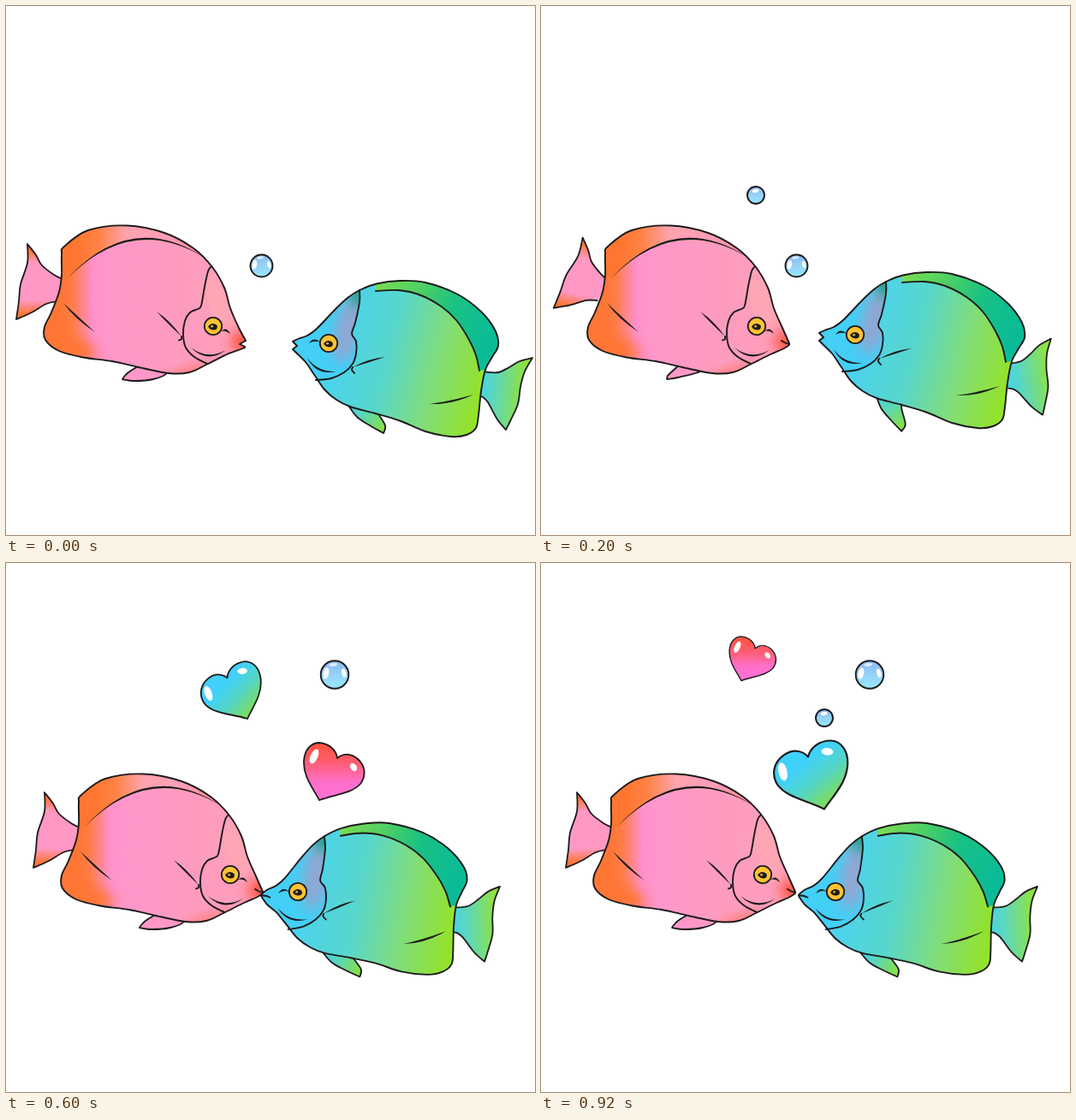
An HTML page for the animation above (1 s loop, 618 by 618 pixels).

```html
<!DOCTYPE html>
<html lang="en">
<head>
<meta charset="utf-8">
<title>Kissing fish</title>
<style>
html, body { margin: 0; width: 100%; height: 100%; overflow: hidden; background: #fff; }
svg { display: block; width: 100%; height: 100%; }
.ink { fill: none; stroke: #1c1a1c; stroke-width: 1.9; stroke-linejoin: round; stroke-linecap: round; }
.fill { stroke: #1c1a1c; stroke-width: 1.8; stroke-linejoin: round; }
.stroke { fill: #1c1a1c; }
</style>
</head>
<body>
<svg id="stage" viewBox="0 0 618 618" xmlns="http://www.w3.org/2000/svg"></svg>
<script>
// Smooth curve through points; "|" marks a sharp corner at the point before it.
function spline(text, close) {
  let d = "", last = null;
  for (const part of text.split("|")) {
    const p = part.trim().split(/\s+/).map(s => s.split(",").map(Number));
    if (last) p.unshift(last);
    else d = "M" + p[0];
    for (let i = 0; i < p.length - 1; i++) {
      const a = p[i - 1] || p[i], b = p[i], c = p[i + 1], e = p[i + 2] || c;
      const q = k => (b[k] + (c[k] - a[k]) / 6).toFixed(1);
      const r = k => (c[k] - (e[k] - b[k]) / 6).toFixed(1);
      d += `C${q(0)},${q(1)} ${r(0)},${r(1)} ${c}`;
    }
    last = p[p.length - 1];
  }
  return d + (close ? "Z" : "");
}

const path = (d, attrs) => `<path d="${d}" ${attrs}/>`;
const ink = text => path(spline(text), 'class="ink"');

// Brush line, thin at both ends.
function brush(x1, y1, cx, cy, x2, y2, w = 2.3) {
  const len = Math.hypot(x2 - x1, y2 - y1);
  const nx = (y1 - y2) / len * w, ny = (x2 - x1) / len * w;
  return path(`M${x1},${y1}Q${cx + nx},${cy + ny} ${x2},${y2}Q${cx - nx},${cy - ny} ${x1},${y1}Z`, 'class="stroke"');
}

function linear(id, x1, y1, x2, y2, stops) {
  const list = stops.map(([at, color]) => `<stop offset="${at}" stop-color="${color}"/>`).join("");
  return `<linearGradient id="${id}" gradientUnits="userSpaceOnUse" x1="${x1}" y1="${y1}" x2="${x2}" y2="${y2}">${list}</linearGradient>`;
}

const spot = (x, y, rx, ry, turn, color, more = "") =>
  `<ellipse cx="${x}" cy="${y}" rx="${rx}" ry="${ry}" transform="rotate(${turn} ${x} ${y})" fill="${color}" ${more}/>`;
const soft = 'filter="url(#soft)"';

function eye(x, y) {
  return `<circle cx="${x}" cy="${y}" r="10.2" fill="#ffc234" class="fill"/>` +
    path(`M${x - 6},${y + .2}Q${x - 1},${y - 5.5} ${x + 4.5},${y - 1}Q${x + 6},${y + 4} ${x + 1},${y + 4.6}Q${x - 4},${y + 4.5} ${x - 6},${y + .2}Z`, 'class="stroke"') +
    spot(x - 1.4, y + .2, 1.5, 1.3, 0, "#e8b040");
}

const pink = {
  top: "272,376 262,353 255,329 241,305 219,283 185,265 141,256.5 96,262 68,281 65,290 65,314 62,334 53,358 45,375 46,390 62,403 90,410.5 124,415 155,422 190,429 214,428 235,418.5 258,407 ",
  open: ["280,391 ", "277,400 279,398 | 273,395 | 280,391"],
  shut: ["280,394 ", "272,401 280,396 | 280,394"],
  fin: ["154,421 143,428 138,433 136,436 | 150,438 172,436 188,429 185,422",
        "154,417 143,427 138,432 137,436 | 150,434 176,427 175,420"],
  tail: "66,319 56,314 42,303 35,291 25,278 | 25,300 17,325 15,345 12,366 | 30,358 47,348 60,345",
  dorsal: "72,318 91,301 112,286 137,277 163,274.5 190,277 213,284 232,294",
  face: "240,304 236,310 232,328 228,350 224,354 215,358 209,368 207,384 210,399 220,410 235,418"
};

const blue = {
  top: "341,389 352,385 363,377 385,354 399,341 413,332 433,324.5 460,321 490,323 528,337 556,358 572,380 575,397 568,410 560,425 555,450 552,478 549,493 538,501 520,503 490,497 460,484.5 430,475.5 402,468 386,460 372,448 361,432 350,416 340,406 ",
  open: ["335,392 ", "335,401 | 340,397 | 335,392"],
  shut: ["334,394 ", "334,396 | 334,394"],
  fin: "398,464 410,480 425,490 441,499 | 443,490 434,475 432,470",
  tail: "552,425 561,427.5 575,428 588,422 600,415 615,411 | 606,427 601,445 598,465 589,485 584,495 | 574,483 563,463 557,457 552,455",
  dorsal: "432,333 458,332 482,337 507,350 526,367 541,390 549,408 553,426",
  face: "413,332 413,346 408,370 404,383 409,392 409,406 405,418 395,428 380,435 362,437"
};

const bodyPath = (fish, open) => {
  const [start, end] = open ? fish.open : fish.shut;
  return spline(start + fish.top + end, true);
};

// A heart whose tip is at the origin.
const heartPath = "M0,0C-8,-15 -19,-28 -18,-46C-17,-61 -8,-67 0,-67C12,-66 20,-58 21,-49C28,-55 37,-55 45,-48C54,-40 55,-28 48,-19C37,-7 18,-7 0,0Z";

const defs = `<defs>
  <filter id="soft" x="-60%" y="-60%" width="220%" height="220%"><feGaussianBlur stdDeviation="8"/></filter>
  <clipPath id="pinkClip"><path class="pinkBody"/></clipPath>
  <clipPath id="blueClip"><path class="blueBody"/></clipPath>
  <clipPath id="blueFace"><path d="${spline(blue.face)}L320,437L320,332Z"/></clipPath>` +
  linear("pinkFill", 45, 345, 280, 345, [[.08, "#ff7634"], [.14, "#ff7c48"], [.24, "#ff90cc"], [.32, "#ff97cb"], [.6, "#fd9bc0"], [1, "#ff9fb9"]]) +
  linear("pinkTop", 65, 290, 240, 290, [[.1, "#ff7630"], [.24, "#ff8243"], [.43, "#ffa3ae"], [.7, "#ff9db9"], [1, "#ff8386"]]) +
  linear("pinkTail", 0, 278, 0, 366, [[.08, "#ff7430"], [.25, "#ff98c2"], [.74, "#ff98c6"], [.94, "#ff7430"]]) +
  linear("blueFill", 385, 395, 555, 440, [[0, "#4bd3ee"], [.35, "#57d6cc"], [.68, "#80dd7c"], [1, "#93e22c"]]) +
  linear("blueTop", 435, 325, 565, 395, [[0, "#78dc55"], [.3, "#50d062"], [.62, "#18c184"], [1, "#0bbb97"]]) +
  linear("blueTail", 556, 440, 606, 445, [[0, "#48d4e2"], [.35, "#5fd8b6"], [1, "#92e23a"]]) +
  linear("blueFin", 405, 468, 440, 497, [[0, "#48d2e4"], [.45, "#60d8a8"], [1, "#8ae03c"]]) +
  linear("warm", 0, -67, 0, 0, [[.08, "#ff5545"], [.35, "#ff5d74"], [.68, "#ff70cb"], [1, "#ff70d6"]]) +
  linear("cool", 35, -55, -10, -10, [[.25, "#40d1fa"], [.6, "#54d5c4"], [1, "#83de50"]]) +
  linear("water", 0, -1, 0, 1, [[0, "#8bb9ef"], [.5, "#96d2f8"], [1, "#96e7ff"]]) +
  "</defs>";

const pinkFish = `<g id="pink">
  <path id="pinkFin" class="fill" fill="#ff98c9"/>
  <g id="pinkTailPart">${path(spline(pink.tail), 'class="fill" fill="url(#pinkTail)"')}</g>
  <g clip-path="url(#pinkClip)">
    <path class="pinkBody" fill="url(#pinkFill)"/>
    ${spot(72, 400, 34, 15, 14, "#ff7634", soft)}
    ${path(spline(pink.dorsal) + "L250,310L250,245L60,245L60,318Z", 'fill="url(#pinkTop)"')}
    ${spot(249, 345, 13, 35, -18, "#ffa8b3", soft)}
    ${spot(218, 430, 30, 7, -15, "#ff7460", soft)}
    ${spot(276, 392, 12, 12, 0, "#ff4526", soft)}
  </g>
  <path class="pinkBody ink"/>
  ${brush(72, 318, 147, 240, 232, 294)}
  ${ink(pink.face)}
  ${brush(67, 347, 82, 364, 104, 381)}
  ${brush(176, 357, 190, 369, 205, 386)}
  ${ink("205,386 205,389 202,390.5")}
  ${brush(216, 399, 235, 416, 257, 402)}
  ${brush(251, 380, 257, 376, 262, 383)}
  ${eye(242, 374)}
  <path id="pinkMouth" class="ink" d="M271,391Q275,394 280,395"/>
</g>`;

const blueFish = `<g id="blue">
  <g id="blueFinPart">${path(spline(blue.fin), 'class="fill" fill="url(#blueFin)"')}</g>
  <g id="blueTailPart">${path(spline(blue.tail), 'class="fill" fill="url(#blueTail)"')}</g>
  <g clip-path="url(#blueClip)">
    <path class="blueBody" fill="url(#blueFill)"/>
    ${path(spline(blue.dorsal) + "L590,420L590,310L432,310Z", 'fill="url(#blueTop)"')}
    <g clip-path="url(#blueFace)">
      <rect x="325" y="325" width="95" height="120" fill="#43cff6"/>
      ${spot(400, 376, 14, 42, 14, "#94a4d0", soft)}
      ${spot(413, 336, 8, 13, 10, "#008c50", soft)}
    </g>
  </g>
  <path class="blueBody ink"/>
  ${path(spline(blue.dorsal), 'class="ink" stroke-width="1.6"')}
  ${ink(blue.face)}
  ${brush(495, 465, 520, 464, 546, 454)}
  ${brush(443, 410, 424, 414, 405, 422)}
  ${ink("405,422 404,425 407,429")}
  ${brush(352, 411, 363, 430, 386, 427)}
  ${brush(354, 394, 360, 388, 367, 393)}
  ${eye(377, 394)}
  <path id="blueMouth" class="ink" d="M334,395Q340,395 344,398"/>
</g>`;

function bubble(x, y, r) {
  const shine = r > 12
    ? spot(-.62, -.1, .2, .42, 10, "#fff") + spot(.66, -.12, .15, .32, -14, "#fff") + spot(-.1, -.72, .3, .12, -8, "#d8ecff")
    : spot(-.05, -.5, .4, .2, -12, "#fff");
  return `<g transform="translate(${x} ${y}) scale(${r})"><circle r="1" fill="url(#water)"/>${shine}` +
    `<circle r="1" class="ink" style="stroke-width:${1.9 / r}"/></g>`;
}

function heart(x, y, size, turn, cool) {
  const shine = cool
    ? spot(44, -32, 4.2, 9, 18, "#fff") + spot(3, -56, 5.8, 3.6, 0, "#fff")
    : spot(-6, -51, 4.2, 9.2, 24, "#fff") + spot(40, -38.5, 3.6, 5, -32, "#fff");
  return `<g transform="translate(${x} ${y}) rotate(${turn}) scale(${cool ? -size : size} ${size})">` +
    path(heartPath, `class="fill" fill="url(#${cool ? "cool" : "warm"})"`) + shine + "</g>";
}

// Each floating thing is visible from one beat up to another.
const floaters = [
  [0, 3, bubble(298.5, 303.5, 13)],
  [1, 3, bubble(251, 221, 10)],
  [2, 4, heart(366, 277, 1, 0, false)],
  [3, 4, heart(282, 182, 1, -3, true)],
  [3, 5, bubble(384, 130.5, 16.3)],
  [4, 5, bubble(331, 181, 10)],
  [4, 5, heart(234, 137.5, .77, 0, false)],
  [4, 5, heart(331, 287.5, 1.2, 6, true)]
];

const beats = [
  { pink: [0, 0],    pinkTail: 0,  pinkOpen: true,  blue: [0, 0, 0],        blueTail: 0,   blueFin: 0,  blueOpen: true },
  { pink: [10, 0],   pinkTail: 14, pinkOpen: false, blue: [-10, -10, 0],    blueTail: -14, blueFin: 17, blueOpen: true },
  { pink: [20, -10], pinkTail: 0,  pinkOpen: true,  blue: [-31, -10, -4.7], blueTail: 11,  blueFin: 0,  blueOpen: true },
  { pink: [20, -10], pinkTail: 0,  pinkOpen: false, blue: [-36, -10, -4.7], blueTail: -4,  blueFin: 0,  blueOpen: false },
  { pink: [17, -10], pinkTail: 0,  pinkOpen: false, blue: [-33, -10, -4.7], blueTail: -4,  blueFin: 0,  blueOpen: false }
];

const stage = document.getElementById("stage");
stage.innerHTML = defs + pinkFish + blueFish +
  floaters.map(f => `<g class="floater">${f[2]}</g>`).join("");

const $ = id => document.getElementById(id);
const floaterNodes = stage.querySelectorAll(".floater");
const move = (id, value) => $(id).setAttribute("transform", value);

function shapeMouth(name, fish, open) {
  const d = bodyPath(fish, open);
  stage.querySelectorAll(`.${name}Body`).forEach(node => node.setAttribute("d", d));
  $(name + "Mouth").style.display = open ? "none" : "";
}

function pose(beat) {
  const b = beats[beat];
  move("pink", `translate(${b.pink})`);
  move("pinkTailPart", `rotate(${b.pinkTail} 62 330)`);
  $("pinkFin").setAttribute("d", spline(pink.fin[b.pinkTail ? 1 : 0]));
  shapeMouth("pink", pink, b.pinkOpen);

  const [x, y, turn] = b.blue;
  move("blue", `translate(${x} ${y}) rotate(${turn} 377 394)`);
  move("blueTailPart", `rotate(${b.blueTail} 560 442)`);
  move("blueFinPart", `rotate(${b.blueFin} 410 470)`);
  shapeMouth("blue", blue, b.blueOpen);

  floaters.forEach(([from, to], i) => {
    floaterNodes[i].style.display = beat >= from && beat < to ? "" : "none";
  });
}

let start = null, shown = 0;
function tick(now) {
  if (start === null) start = now;
  const beat = Math.floor((now - start) % 1000 / 200);
  if (beat !== shown) pose(shown = beat);
  requestAnimationFrame(tick);
}
pose(0);
requestAnimationFrame(tick);
</script>
</body>
</html>
```
